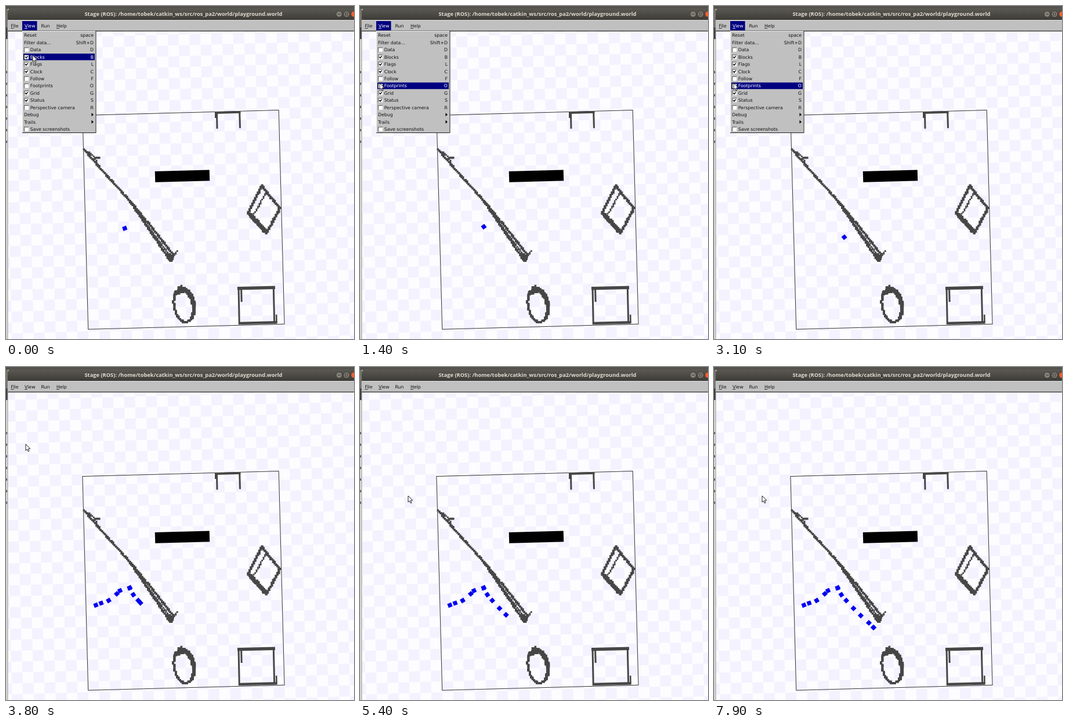
Animation, 600 px wide and 574 px high, one loop 8 s. Source, as an HTML page with a canvas:

```html
<!DOCTYPE html>
<html lang="en">
<head>
<meta charset="utf-8">
<title>Robot simulator</title>
<style>
html, body { margin: 0; width: 100%; height: 100%; overflow: hidden; background: #fdfcff; }
canvas { display: block; width: 600px; height: 574px; }
</style>
</head>
<body>
<canvas></canvas>
<script>
const W = 600, H = 574, LOOP = 8000, MENU_CLOSE = 3400;
const TILT = -.0266, CELL = 18.8;
const INK = '#464646', PANEL = '#c0c0c0', NAVY = '#000080', BLUE = '#0000f0';
const canvas = document.querySelector('canvas');
const ratio = window.devicePixelRatio || 1;
canvas.width = W * ratio;
canvas.height = H * ratio;
let c = canvas.getContext('2d');

function rect(x, y, w, h, color) {
  c.fillStyle = color;
  c.fillRect(x, y, w, h);
}

function path(points) {
  c.beginPath();
  points.forEach(([x, y]) => c.lineTo(x, y));
}

function line(points, width, color = INK) {
  path(points);
  c.lineWidth = width;
  c.strokeStyle = color;
  c.stroke();
}

function fill(points, color) {
  path(points);
  c.fillStyle = color;
  c.fill();
}

function disc(x, y, r, color) {
  c.beginPath();
  c.arc(x, y, r, 0, 7);
  c.fillStyle = color;
  c.fill();
}

function text(s, x, y, color = '#111', align = 'left', font = '7.8px "DejaVu Sans", sans-serif') {
  c.font = font;
  c.textAlign = align;
  c.fillStyle = color;
  c.fillText(s, x, y);
}

// Draws in a frame centred on (x, y) and turned by an angle.
function turned(x, y, angle, draw) {
  c.save();
  c.translate(x, y);
  c.rotate(angle);
  draw();
  c.restore();
}

// Stamps blocks along a polyline on a coarse grid, like a scaled-up bitmap.
function trace(points, size = 3.6, grid = 2.4) {
  const snap = v => Math.round(v / grid) * grid - size / 2;
  for (let i = 1; i < points.length; i++) {
    const [x0, y0] = points[i - 1], [x1, y1] = points[i];
    const n = Math.ceil(Math.hypot(x1 - x0, y1 - y0) / 2);
    for (let k = 0; k <= n; k++)
      rect(snap(x0 + (x1 - x0) * k / n), snap(y0 + (y1 - y0) * k / n), size, size, INK);
  }
}

function drawFloor() {
  rect(0, 0, W, H, '#fdfcff');
  turned(306, 368.4, TILT, () => {
    for (let i = -18; i < 18; i++)
      for (let j = -19; j < 14; j++)
        if ((i + j) % 2 === 0) rect(i * CELL, j * CELL, CELL, CELL, '#f4f2fe');
    c.lineWidth = 1;
    c.strokeStyle = '#333';
    c.strokeRect(-169.2, -184.5, 338.4, 369);
    rect(-2.5 * CELL, -4.5 * CELL, 5 * CELL, CELL, '#000');
  });
}

function drawBracket() {
  line([[360, 184.3], [404.5, 183]], 3.4);
  line([[362, 184], [362, 193]], 4);
  line([[363.5, 184], [364, 211.5]], 3);
  line([[402.7, 183], [403.5, 210.5]], 3);
}

function drawDiagonal() {
  const bend = [212, 334], tip = [284, 440];
  trace([[135, 247], [160, 277], bend, tip]);
  trace([bend, [250, 380], [288, 429], tip]);
  trace([bend, [282, 430]], 2.6);
  trace([[280, 429], [286, 434]], 7);
  trace([[289, 430], [296, 422]], 2.6);
  trace([[142, 251], [153, 261], [156, 269]], 2.6);
  trace([[157, 261], [160, 261]]);
}

function drawDiamond() {
  const left = [417.5, 357], bottom = [449, 392];
  trace([[441, 310], [472, 349], bottom, left, [441, 310]], 4);
  trace([[422, 360], [446, 387]], 6);
  trace([[448, 323], [428, 358]], 2.6);
}

// Leaning ring, heavier on its upper right, with a clump on top.
function drawRing() {
  const at = a => {
    const y = 28.5 * Math.sin(a);
    return [306.5 + 17 * Math.cos(a) + y * .12, 516 + y];
  };
  for (let a = 0; a < 6.28; a += .1)
    trace([at(a), at(a + .1)], 3.6 + 3 * Math.max(0, Math.cos(a + .6)));
  trace([[292, 495], [304, 491]], 6);
  trace([[297, 485], [302, 483]]);
}

function drawSquare() {
  line([[399, 486.7], [464, 485.2]], 5.5);
  line([[401, 485], [402.3, 549]], 3);
  line([[461.3, 485], [462.7, 546]], 3);
  line([[401, 547], [467.5, 545.3]], 4.5);
  line([[405.6, 487], [406.2, 510]], 3);
  line([[466.2, 532], [466.5, 546]], 2.6);
}

function drawBackWindow() {
  rect(0, 0, 3, H, '#d6d4d1');
  rect(0, 0, W, 5, '#55524d');
  rect(0, 5, 3, 32, '#75716b');
  rect(0, 37, 3, 20, '#3f3d39');
  for (let y = 112; y < 240; y += 20) rect(0, y, 2, 4, '#666');
  rect(2.5, 25, 1, H, '#a3a19e');
}

function drawFrame() {
  const shade = c.createLinearGradient(0, 4, 0, 24);
  shade.addColorStop(0, '#5b5953');
  shade.addColorStop(1, '#3d3b37');
  c.fillStyle = shade;
  c.beginPath();
  c.roundRect(3, 4, 610, 24, 5);
  c.fill();
  text('Stage (ROS): /home/tobek/catkin_ws/src/ros_pa2/world/playground.world',
    306, 17.3, '#dfdbd2', 'center', 'bold 9.3px "Open Sans", sans-serif');
  ['#85827a', '#85827a', '#ef6034'].forEach((color, i) => {
    disc(574.3 + i * 12.8, 14, 5.5, '#35332f');
    disc(574.3 + i * 12.8, 14, 4.8, color);
  });
  line([[572, 14], [577, 14]], 1, '#3b3935');
  c.strokeRect(585, 12, 4, 4);

  rect(3, 24, W, 19, PANEL);
  rect(3, 24, W, 1, '#e2e2e2');
  rect(3, 42.5, W, 1.3, '#333');
}

function drawMenuBar(open) {
  if (open) rect(28, 26, 25.5, 16, NAVY);
  [['File', 8.5], ['View', 32], ['Run', 60.5], ['Help', 87]].forEach(([label, x]) => {
    const color = open && label === 'View' ? '#fff' : '#111';
    text(label, x, 36.8, color);
    if (label !== 'Run') rect(x, 38, 5, .8, color);
  });
}

// Leading + or - marks a checkbox, > a submenu; the shortcut follows the bar.
const ITEMS = [
  ' Reset|space', ' Filter data...|Shift+D', '-Data|D', '+Blocks|B', '+Flags|L', '+Clock|C',
  '-Follow|F', '-Footprints|O', '+Grid|G', '+Status|S', '-Perspective camera|R',
  '>Debug|', '>Trails|', '-Save screenshots|'
];
const ROW = 12.44, MENU_TOP = 44.3;

function drawMenu(active) {
  rect(28, 43, 127.5, 176, '#222');
  rect(28, 43, 126.3, 175, '#eee');
  rect(29, 44, 125.3, 174, PANEL);
  ITEMS.forEach((item, i) => {
    const kind = item[0], [label, key] = item.slice(1).split('|');
    const mid = MENU_TOP + (i + .5) * ROW, on = i === active;
    const color = on ? '#fff' : '#111', box = '+-'.includes(kind);
    if (on) rect(30, mid - 5.8, 123, 11.4, NAVY);
    if (box) {
      rect(31, mid - 4, 8, 8, '#555');
      rect(32, mid - 3, 7, 7, '#fff');
    }
    if (kind === '+') line([[33, mid - .5], [34.7, mid + 1.8], [37.6, mid - 1.6]], 1.4, '#000');
    if (kind === '>') fill([[147.5, mid - 3], [151, mid], [147.5, mid + 3]], '#000');
    text(label, box ? 41.7 : 31, mid + 2.8, color);
    text(key, 151, mid + 2.8, color, 'right');
  });
}

// The robot passes one waypoint per second and leaves a footprint there.
const WAYPOINTS = [
  [155, 410.5], [164, 407], [177, 402.5], [191, 391], [196.5, 385.5], [213, 381], [213.5, 380.5],
  [219.5, 392.5], [228, 402.5], [240.5, 416], [253, 428.3], [267, 441], [275, 449]
];
const LAST = WAYPOINTS.length - 1;
const mix = (a, b, u) => a + (b - a) * u;
const ramp = (t, from, to) => Math.min(1, Math.max(0, (t - from) / (to - from)));

function heading(i) {
  const [x0, y0] = WAYPOINTS[Math.max(0, i - 1)], [x1, y1] = WAYPOINTS[Math.min(LAST, i + 1)];
  return Math.atan2(y1 - y0, x1 - x0);
}

function drawRobot(at) {
  const i = Math.min(LAST - 1, Math.floor(at)), u = at - i;
  const [x0, y0] = WAYPOINTS[i], [x1, y1] = WAYPOINTS[i + 1];
  turned(mix(x0, x1, u), mix(y0, y1, u), mix(heading(i), heading(i + 1), u),
    () => rect(-3.6, -3.6, 7.2, 7.2, BLUE));
}

function pointerAt(t) {
  const a = ramp(t, 0, 800), b = ramp(t, 4600, 5100);
  return [46 - 12 * a + 49 * b, 85 + 48 * a + 89 * b];
}

function drawPointer(x, y) {
  const shape = [[0, 0], [0, 11], [2.5, 8.8], [4.3, 12.8], [6, 12], [4.2, 8], [7.8, 8], [0, 0]]
    .map(([dx, dy]) => [x + dx, y + dy]);
  fill(shape, '#fff');
  line(shape, 1, '#222');
}

function layer(draw) {
  const el = document.createElement('canvas'), main = c;
  el.width = canvas.width;
  el.height = canvas.height;
  c = el.getContext('2d');
  c.scale(ratio, ratio);
  draw();
  c = main;
  return el;
}

const scene = layer(() => {
  drawFloor();
  drawBracket();
  drawDiagonal();
  drawDiamond();
  drawRing();
  drawSquare();
  drawBackWindow();
  drawFrame();
});
c.scale(ratio, ratio);

function render(now) {
  const t = Math.floor(now % LOOP / 100) * 100, open = t < MENU_CLOSE;
  const [px, py] = pointerAt(t), at = Math.min(LAST, 4.5 + t / 1000);
  c.drawImage(scene, 0, 0, W, H);
  if (!open) for (let i = 0; i <= at; i++) drawRobot(i);
  drawRobot(at);
  drawMenuBar(open);
  if (open) drawMenu(Math.floor((py - MENU_TOP) / ROW));
  drawPointer(px, py);
}

const start = performance.now();
function tick() {
  render(performance.now() - start);
  requestAnimationFrame(tick);
}
tick();
</script>
</body>
</html>
```
